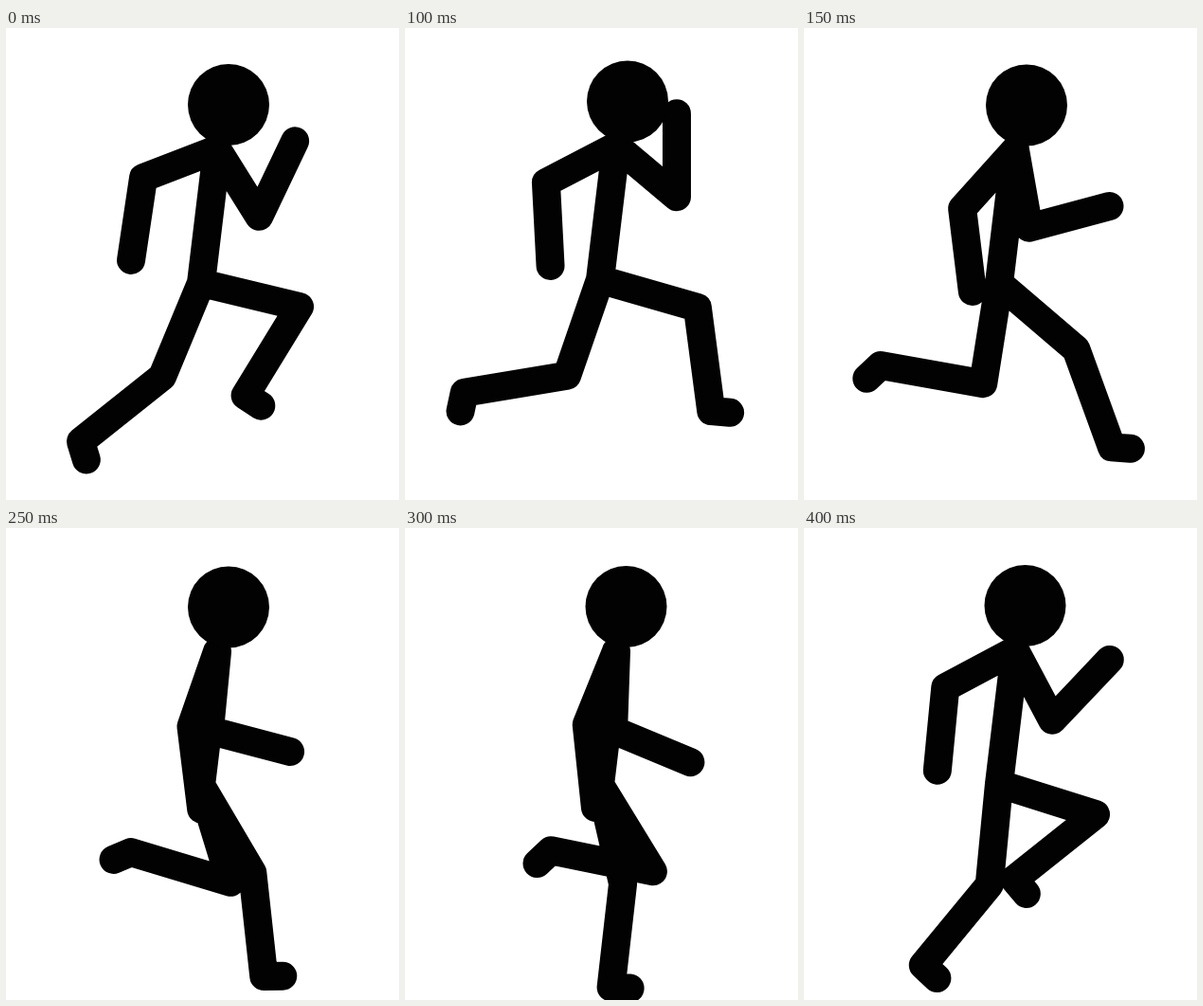
Recreate the animation shown at these times as an HTML page. Size 415 by 498 pixels, loop 450 ms.

```html
<!DOCTYPE html>
<html lang="en">
<head>
<meta charset="utf-8">
<title>Running stick figure</title>
<style>
  html, body { margin: 0; width: 100%; height: 100%; overflow: hidden; background: #fff; }
  svg { display: block; width: 415px; height: 498px; fill: #020203; }
  path { fill: none; stroke: #020203; stroke-width: 30; stroke-linecap: round; stroke-linejoin: round; }
</style>
</head>
<body>
<svg viewBox="0 0 415 498">
  <path id="limbs"/>
  <circle id="head" r="43"/>
</svg>
<script>
const STEP = 50;
const STEPS = 9;
const ARM = [83.5, 88];
const LEG = [107, 110, 20];

// Key poses of the stride; limbs are bone angles in degrees, clockwise from the right.
const keys = [
  { step: 0, head: [235, 81],   rearArm: [159, 98.5], frontArm: [58, -64.5], landing: [13.5, 121.5, 33], swinging: [112.5, 141.5, 73] },
  { step: 2, head: [235, 77.5], rearArm: [152.5, 87], frontArm: [40, -90],   landing: [16, 82.5, 5],     swinging: [109, 170.5, 102] },
  { step: 3, head: [235, 81.5], rearArm: [132, 83],   frontArm: [80, -15],   landing: [40.5, 70, 4],     swinging: [99, 190, 137] },
  { step: 4, head: [236.5, 84], rearArm: [106.5, 82], frontArm: [99, 7],     landing: [42, 71, -5],      swinging: [87.5, 202, 177] },
  { step: 6, head: [233.5, 83], rearArm: [112, 84],   frontArm: [92, 22.5],  landing: [77, 96.5, 3],     swinging: [58.5, 191.5, 137] },
  { step: 8, head: [233.5, 82], rearArm: [152, 95.5], frontArm: [62, -46.5], landing: [95.5, 129.5, 43], swinging: [17.5, 141.5, 50] }
];

const limbs = document.getElementById('limbs');
const head = document.getElementById('head');

// Returns a reader that blends one part between the keys around a step.
function poseAt(step) {
  const next = keys.find(key => key.step >= step);
  const prev = keys.findLast(key => key.step <= step);
  const t = (step - prev.step) / (next.step - prev.step || 1);
  return part => prev[part].map((v, i) => v + (next[part][i] - v) * t);
}

function limb([x, y], lengths, angles) {
  return `M${x} ${y}` + lengths.map((length, i) => {
    const a = angles[i] * Math.PI / 180;
    return `l${(length * Math.cos(a)).toFixed(2)} ${(length * Math.sin(a)).toFixed(2)}`;
  }).join('');
}

function draw(step) {
  const pose = poseAt(step);
  const [x, y] = pose('head');
  const neck = [223, y + 47];
  const hip = [206, y + 188];
  head.setAttribute('cx', x);
  head.setAttribute('cy', y);
  limbs.setAttribute('d', `M${neck}L${hip}` +
    limb(neck, ARM, pose('rearArm')) +
    limb(neck, ARM, pose('frontArm')) +
    limb(hip, LEG, pose('landing')) +
    limb(hip, LEG, pose('swinging')));
}

function tick() {
  draw(Math.floor(performance.now() / STEP) % STEPS);
  requestAnimationFrame(tick);
}
tick();
</script>
</body>
</html>
```
